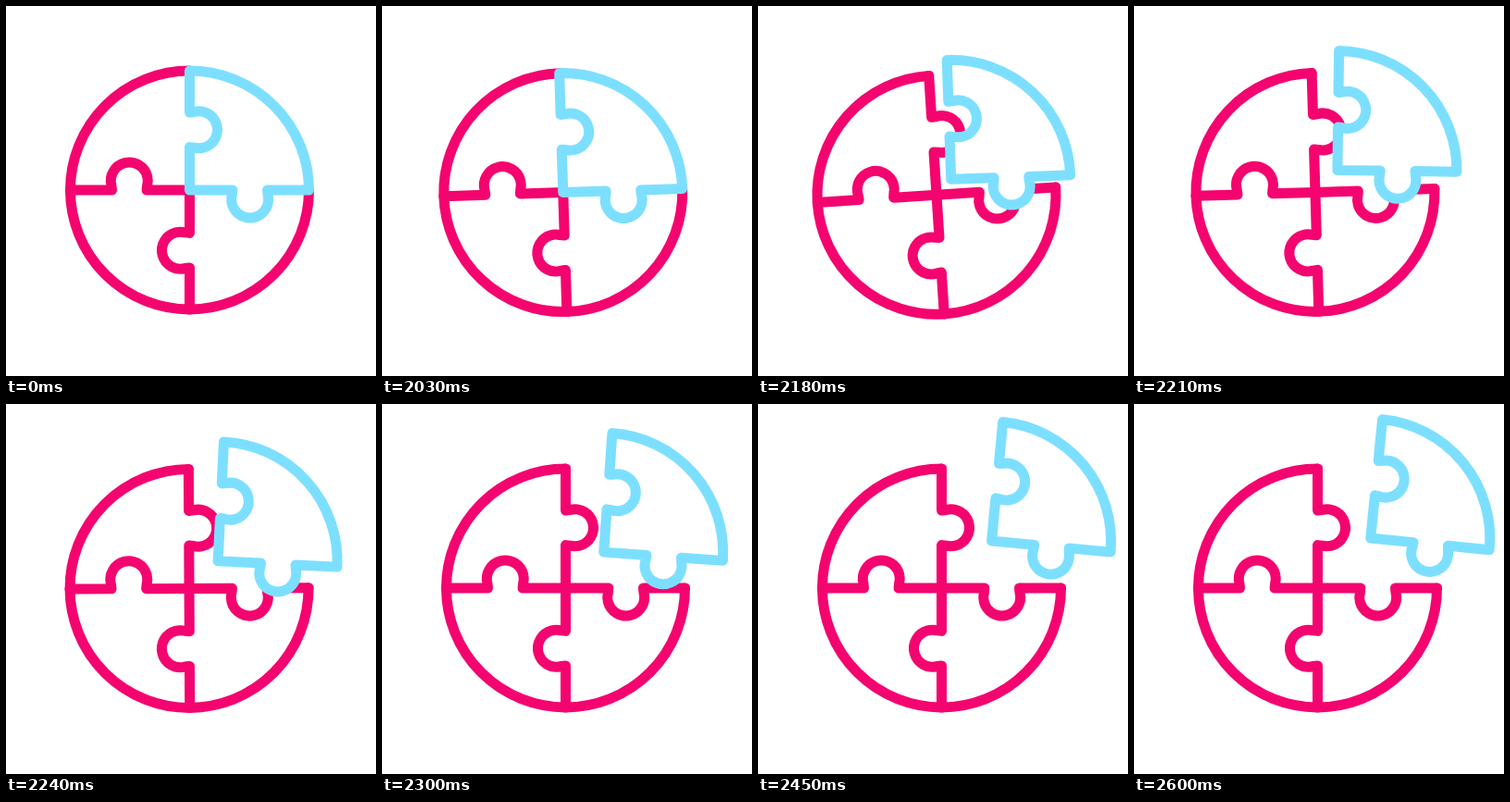
Write an HTML page with a canvas that moves like this. It is 400 px wide and 400 px high and loops after 2.66 s.

```html
<!DOCTYPE html>
<html lang="en">
<head>
<meta charset="utf-8">
<title>Puzzle</title>
<style>
  html, body { margin: 0; width: 100%; height: 100%; overflow: hidden; background: #fff; }
  canvas { display: block; width: 400px; height: 400px; }
</style>
</head>
<body>
<canvas id="stage" width="400" height="400"></canvas>
<script>
const ctx = document.getElementById('stage').getContext('2d');
const LOOP = 2660, HOLD = 2030, STEP = 30;
const PINK = '#f4046f', CYAN = '#7ddfff';
const CX = 198.5, CY = 199, R = 129;
const FOOT = 1.823; // angle where a knob meets its arm
const rad = deg => deg * Math.PI / 180;
const clamp = v => Math.min(1, Math.max(0, v));
const smooth = u => (1 - Math.cos(Math.PI * clamp(u))) / 2;

function bezier(u, x1, y1, x2, y2) {
  if (u <= 0 || u >= 1) return clamp(u);
  const at = (s, a, b) => 3 * (1 - s) * (1 - s) * s * a + 3 * (1 - s) * s * s * b + s * s * s;
  let lo = 0, hi = 1;
  for (let i = 0; i < 30; i++) {
    const mid = (lo + hi) / 2;
    if (at(mid, x1, x2) < u) lo = mid; else hi = mid;
  }
  return at(lo, y1, y2);
}

// One arm with a knob, turned by quarter turns; runs to or from the centre.
function arm(turn, outward) {
  ctx.save();
  ctx.rotate(turn * Math.PI / 2);
  if (outward) {
    ctx.lineTo(0, 0);
    ctx.lineTo(0, -46.4);
    ctx.arc(10, -65.2, 20, FOOT, -FOOT, true);
    ctx.lineTo(0, -84);
    ctx.lineTo(0, -R);
  } else {
    ctx.lineTo(0, -R);
    ctx.lineTo(0, -84);
    ctx.arc(10, -65.2, 20, -FOOT, FOOT);
    ctx.lineTo(0, -46.4);
    ctx.lineTo(0, 0);
  }
  ctx.restore();
}

function drawBody(open) {
  ctx.strokeStyle = PINK;
  ctx.beginPath();
  ctx.arc(0, 0, R, 0, Math.PI * 1.5);
  ctx.stroke();
  for (const turn of open ? [0, 1, 2, 3] : [2, 3]) {
    ctx.beginPath();
    arm(turn, false);
    ctx.stroke();
  }
}

function drawPiece() {
  ctx.strokeStyle = CYAN;
  ctx.fillStyle = '#fff';
  ctx.beginPath();
  arm(0, false);
  arm(1, true);
  ctx.arc(0, 0, R, 0, -Math.PI / 2, true);
  ctx.closePath();
  ctx.fill();
  ctx.stroke();
}

function draw(time) {
  let t = time % LOOP, recoil = 0, away = 0;
  if (t >= HOLD) {
    t = HOLD + Math.floor((t - HOLD) / STEP) * STEP;
    recoil = t < 2120 ? smooth((t - 1977) / 143) : 1 - smooth((t - 2120) / 140);
    away = bezier((t - 2110) / 490, 0.13, 0.08, 0.22, 1);
  }
  ctx.setTransform(1, 0, 0, 1, 0, 0);
  ctx.fillStyle = '#fff';
  ctx.fillRect(0, 0, 400, 400);
  ctx.lineWidth = 11;
  ctx.lineCap = ctx.lineJoin = 'round';
  ctx.translate(CX - 9 * recoil, CY + 8.5 * recoil);
  ctx.rotate(rad(-6 * recoil));
  drawBody(away > 0);
  ctx.translate(57.3 * away, -54 * away);
  ctx.rotate(rad(5.7 * away));
  drawPiece();
}

const start = performance.now();
function tick() {
  draw(performance.now() - start);
  requestAnimationFrame(tick);
}
tick();
</script>
</body>
</html>
```
